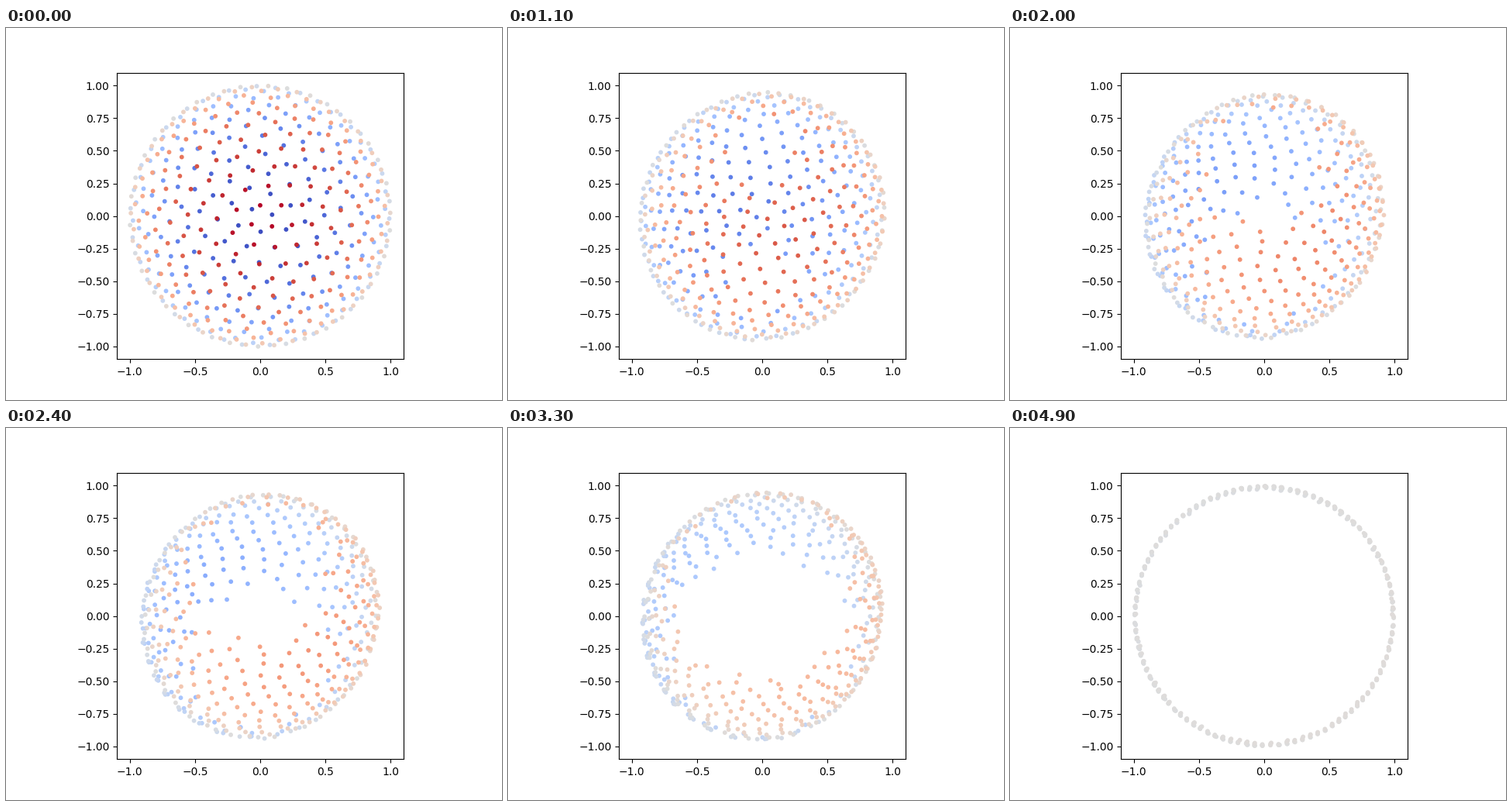
Write a matplotlib script that moves like this. It is 640x480 px and loops after 5000 ms.

```python
import numpy as np
import matplotlib.pyplot as plt
from matplotlib.animation import FuncAnimation

FRAMES, INTERVAL = 50, 100
COUNT, STOPS = 500, 100
PHASE = np.radians(7)
TILT, TURN = np.radians(41), np.radians(47)


def spiral(n):
    """Golden-angle spiral over the unit sphere, from z = -1 to z = 1."""
    i = np.arange(n)
    z = (2 * i + 1) / n - 1
    r = np.sqrt(1 - z ** 2)
    angle = np.pi * (3 - np.sqrt(5)) * i + PHASE
    return np.column_stack([r * np.cos(angle), r * np.sin(angle), z])


def relax(points, rounds=200):
    """Even out the spacing by mutual repulsion along the sphere."""
    for _ in range(rounds):
        dist2 = np.maximum(2 - 2 * points @ points.T, 1e-4)
        np.fill_diagonal(dist2, np.inf)
        weight = dist2 ** -2
        push = points * weight.sum(axis=1, keepdims=True) - weight @ points
        push -= points * (push * points).sum(axis=1, keepdims=True)
        points = points + 3e-5 * push
        points /= np.linalg.norm(points, axis=1, keepdims=True)
    return points


def ring_targets(points):
    """Share the points equally among evenly spaced stops on the circle."""
    x, y, z = points.T
    angle = np.arctan2(y * np.cos(TILT) - z * np.sin(TILT), x) + TURN
    rank = np.argsort(np.argsort((angle + np.pi / STOPS) % (2 * np.pi)))
    stop = 2 * np.pi * (rank * STOPS // len(points)) / STOPS
    return np.column_stack([np.cos(stop), np.sin(stop), np.zeros(len(points))])


sphere = relax(spiral(COUNT))
ring = ring_targets(sphere)

fig, ax = plt.subplots(figsize=(6.4, 4.8), dpi=100)
ax.set_aspect("equal")
ax.set_xlim(-1.098, 1.098)
ax.set_ylim(-1.0967, 1.0995)
dots = ax.scatter(sphere[:, 0], sphere[:, 1], c=sphere[:, 2], s=10,
                  cmap="coolwarm", vmin=-1, vmax=1)


def update(frame):
    t = frame / FRAMES
    now = (1 - t) * sphere + t * ring
    dots.set_offsets(now[:, :2])
    dots.set_array(now[:, 2])
    return (dots,)


anim = FuncAnimation(fig, update, frames=FRAMES, interval=INTERVAL, repeat=True)
plt.show()
```
